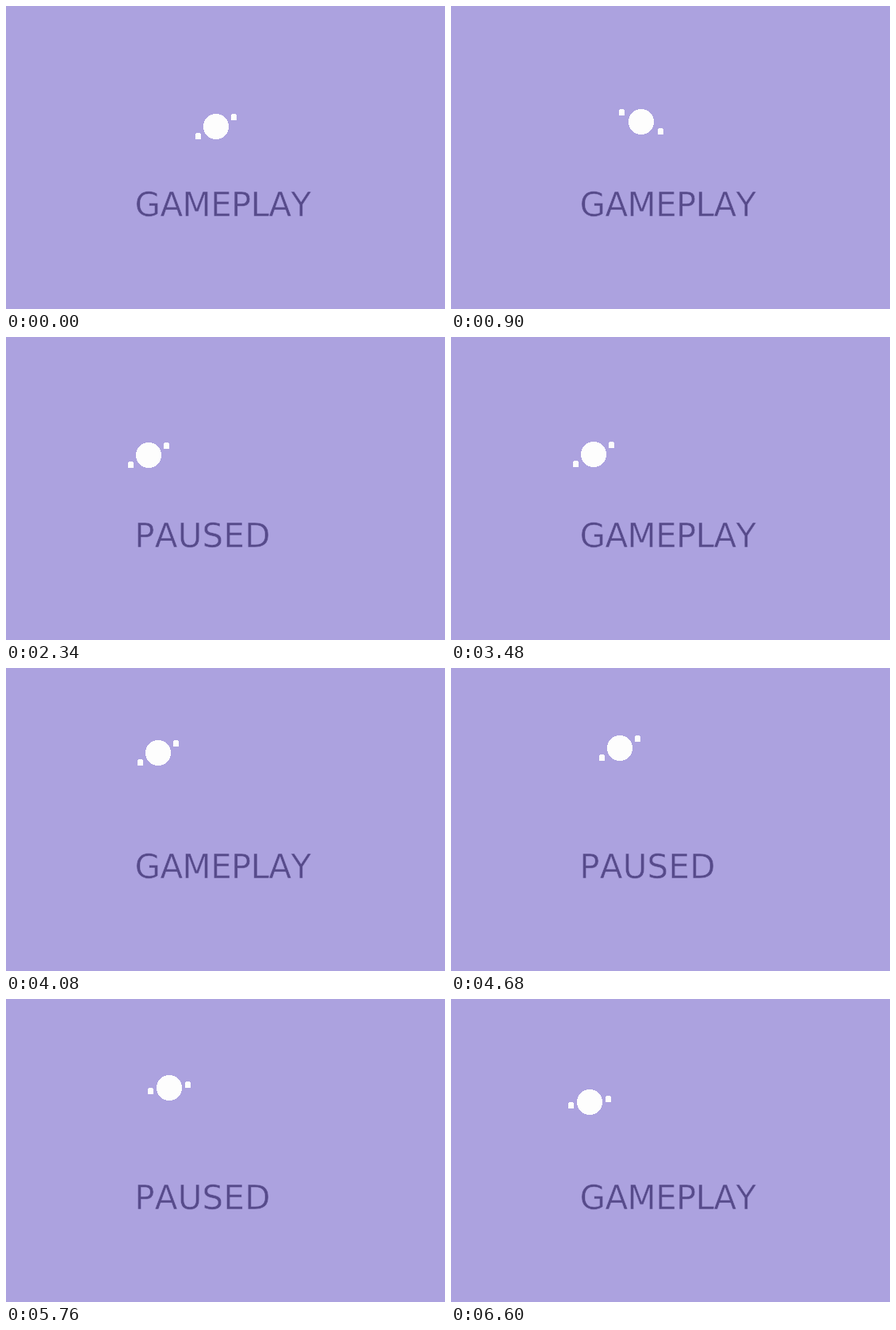
These frames come from a looping animation (554x382 px, 6720 ms). An HTML page:

```html
<!DOCTYPE html>
<html lang="en">
<head>
<meta charset="utf-8">
<title>Pause demo</title>
<style>
  html, body { margin: 0; width: 100%; height: 100%; overflow: hidden; background: #aca2df; }
  svg { display: block; width: 554px; height: 382px; }
  /* The background-coloured outline thins the letters */
  text {
    font: 42px "DejaVu Sans", Verdana, sans-serif; font-kerning: none;
    fill: #574b8b; stroke: #aca2df; stroke-width: .5px;
  }
  #play { letter-spacing: -.65px; }
  #paused { letter-spacing: .2px; }
  #hero { fill: #fdfdfd; shape-rendering: crispEdges; }
</style>
</head>
<body>
<svg viewBox="0 0 554 382">
  <defs><path id="hand" d="M0 8V2.5Q0 0 2.5 0H4.5Q7 0 7 2.5V8Z"/></defs>
  <text id="play" x="162.6" y="264.6">GAMEPLAY</text>
  <text id="paused" x="162.2" y="264.6" visibility="hidden">PAUSED</text>
  <g id="hero">
    <circle r="16"/>
    <use id="left" href="#hand"/>
    <use id="right" href="#hand"/>
  </g>
</svg>
<script>
const LOOP = 6720, STEP = 60, LAST_STEP = 6600;
const POSE_TIME = 98.5, RESUME_LAG = 15;
const pauses = [[2340, 3480], [4680, 5040], [5760, 6300]];

// Key points of the walk: game time, x, y
const walk = [
  [660, 265, 152], [720, 252, 152], [1440, 204, 126], [1560, 228, 126],
  [2160, 193, 149], [2340, 180, 149], [3015, 193, 103], [3555, 213, 101],
  [4230, 192, 112], [4290, 206, 112], [4605, 175, 130]
];

const el = id => document.getElementById(id);
const play = el("play"), paused = el("paused");
const hero = el("hero"), left = el("left"), right = el("right");

const move = (node, x, y) => node.setAttribute("transform", `translate(${x} ${y})`);
const show = (node, on) => node.setAttribute("visibility", on ? "visible" : "hidden");
const clamp = v => Math.max(0, Math.min(1, v));
const mix = (a, b, k) => Math.round(a + (b - a) * k);

function position(time) {
  const next = walk.findIndex(p => p[0] > time);
  const i = next < 0 ? walk.length - 1 : Math.max(1, next);
  const [t0, x0, y0] = walk[i - 1], [t1, x1, y1] = walk[i];
  const k = clamp((time - t0) / (t1 - t0));
  return [mix(x0, x1, k), mix(y0, y1, k)];
}

// Game time stands still while paused
function gameTime(t) {
  let lost = 0;
  for (const [from, to] of pauses) {
    if (t < from) break;
    if (t < to) return from - lost;
    lost += to - from - RESUME_LAG;
  }
  return t - lost;
}

// Hands swing through four poses and back
function swing(time) {
  const beat = Math.floor(time / POSE_TIME + 0.4) % 6;
  const pose = 3 - Math.abs(3 - beat);
  return [22.5 + Math.min(pose, 2), 12 - 8 * pose];
}

function draw(t) {
  const isPaused = pauses.some(([from, to]) => t >= from && t < to);
  const time = gameTime(t);
  const [dx, dy] = swing(time);
  move(hero, ...position(time));
  move(left, -dx - 3.5, dy - 4);
  move(right, dx - 3.5, -dy - 4);
  show(play, !isPaused);
  show(paused, isPaused);
}

const start = performance.now();
function tick() {
  const t = (performance.now() - start) % LOOP;
  draw(Math.min(Math.floor(t / STEP) * STEP, LAST_STEP));
  requestAnimationFrame(tick);
}
tick();
</script>
</body>
</html>
```
